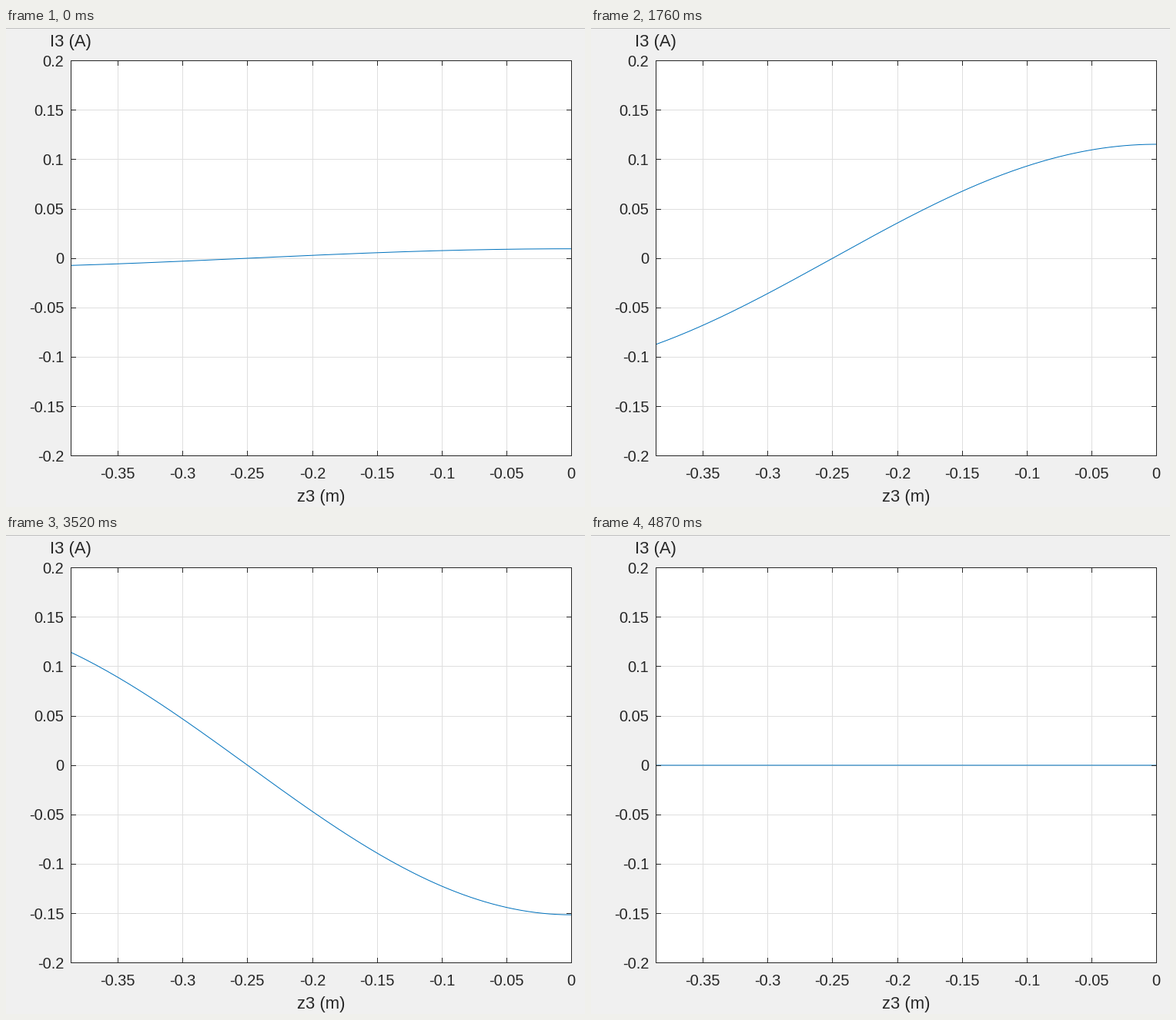
A matplotlib script that plays this animation: 752x622 px, repeating every 4.91 s.

```python
import numpy as np
import matplotlib.pyplot as plt
from matplotlib.animation import FuncAnimation
from matplotlib.collections import LineCollection
from matplotlib.patches import Rectangle

W, H, DPI = 752, 622, 64
PX = 72 / DPI                      # one pixel in points
LOOP, TICK, HOLD = 4910, 10, 40    # ms
LEFT, RIGHT, TOP, BOTTOM = 84.5, 734.5, 42.5, 555.5
MID = (TOP + BOTTOM) / 2
X_STEP, Y_STEP = 84.15, 64.125     # pixels per 0.05 units
PEAK = 196                         # amplitude in pixels
INK = "#262626"

plt.rcParams["font.family"] = "Liberation Sans"

fig = plt.figure(figsize=(W / DPI, H / DPI), dpi=DPI, facecolor="#f0f0f0")
ax = fig.add_axes([0, 0, 1, 1])
ax.set_xlim(0, W)
ax.set_ylim(H, 0)
ax.axis("off")


def strokes(segments, color, z):
    # coordinates already lie on pixel centres, so no snapping
    ax.add_collection(LineCollection(segments, colors=color, linewidths=PX,
                                     capstyle="butt", snap=False, zorder=z))


def frame(z, **style):
    ax.add_patch(Rectangle((LEFT, TOP), RIGHT - LEFT, BOTTOM - TOP,
                           snap=False, zorder=z, **style))


def label(x, y, text, size=20, ha="center"):
    ax.text(x, y, text, fontsize=size * PX, color=INK, ha=ha, va="baseline")


xs = [round(734.2 - X_STEP * k) + 0.5 for k in range(8)]
ys = [int(42.65 + Y_STEP * k) + 0.5 for k in range(9)]

frame(0, facecolor="white", edgecolor="none")
strokes([[(0, 0.5), (W, 0.5)]], "#c0c0c0", 1)

grid = [[(x, TOP), (x, BOTTOM)] for x in xs[1:]]
grid += [[(LEFT, y), (RIGHT, y)] for y in ys[1:-1]]
strokes(grid, "#dfdfdf", 1)

ticks = []
for x in xs:
    ticks += [[(x, TOP), (x, TOP + 6.5)], [(x, BOTTOM), (x, BOTTOM - 6.5)]]
for y in ys:
    ticks += [[(LEFT, y), (LEFT + 6.5, y)], [(RIGHT, y), (RIGHT - 6.5, y)]]
strokes(ticks, INK, 4)
frame(4, fill=False, edgecolor=INK, linewidth=PX)

for k, x in enumerate(xs):
    label(x - 0.5, 585, f"{-0.05 * k:g}" if k else "0")
for k in range(9):
    label(75.5, TOP + Y_STEP * k + 7.2, f"{(4 - k) / 20:g}", ha="right")
label(84, 24, "I3 (A)", 22)
label((LEFT + RIGHT) / 2, 615, "z3 (m)", 22)

# Standing wave: a cosine along z whose amplitude follows a slightly uneven sine
px = np.linspace(LEFT, RIGHT, 140)
shape = np.cos(np.pi * (px - RIGHT) / (10 * X_STEP))
curve, = ax.plot(px, px * 0 + MID, color="#0072bd", linewidth=PX,
                 snap=False, zorder=3)

STEPS = [0, 16, 42, 58, 75, 84, 98, 102, 112, 122]
PHASES = [3.6, 48.5, 125, 172.7, 223.8, 250.7, 290.7, 302.3, 329.9, 360]


def update(i):
    t = i * TICK
    # one step is 10 ms shorter than the rest
    step = t // HOLD if t < 3640 else (t + 10) // HOLD
    phase = np.radians(np.interp(step, STEPS, PHASES))
    curve.set_ydata(MID - PEAK * np.sin(phase) * shape)
    return curve,


anim = FuncAnimation(fig, update, frames=LOOP // TICK, interval=TICK,
                     repeat=True, repeat_delay=0, blit=False)
plt.show()
```
